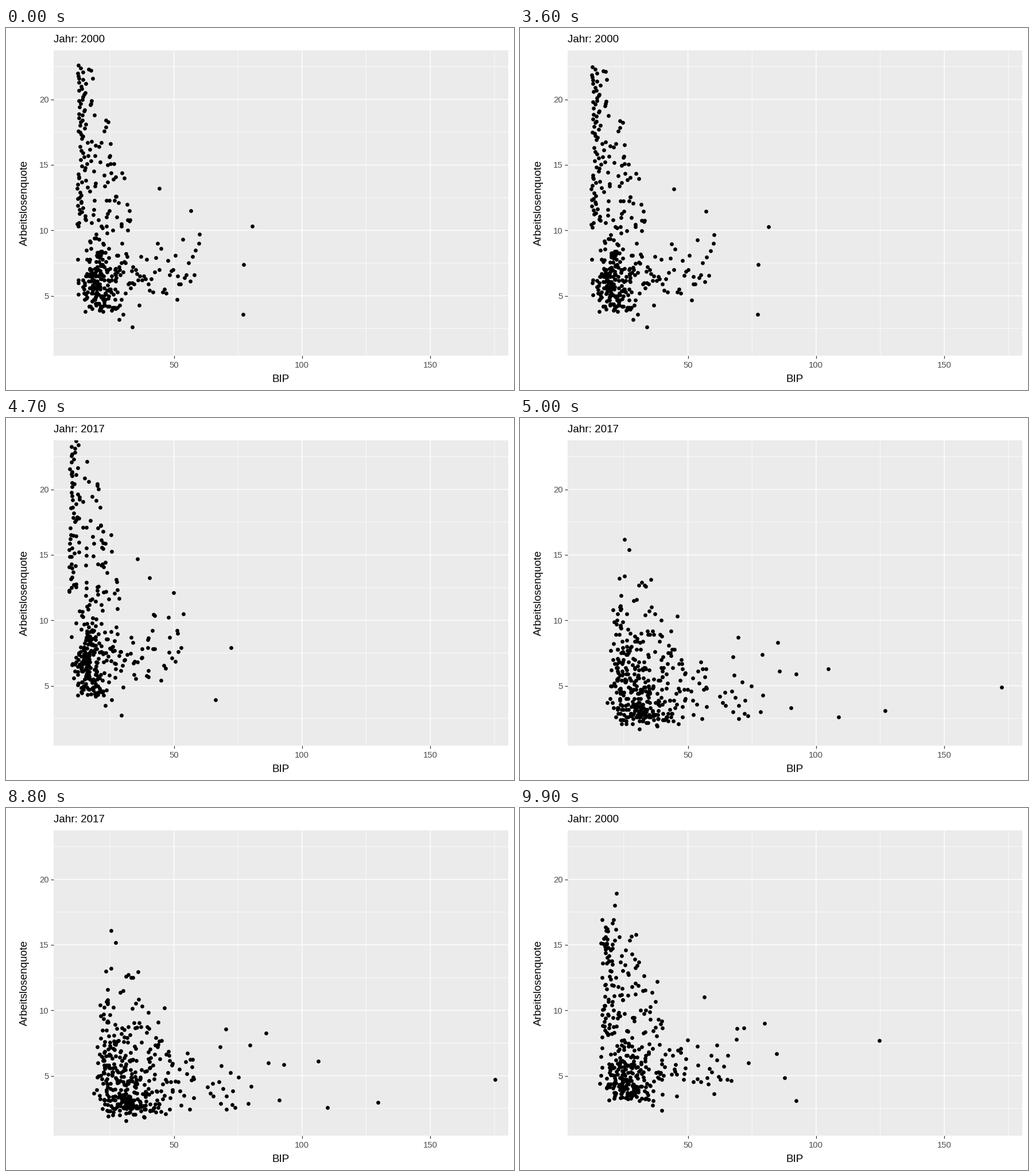
Recreate the animation shown at these times as a matplotlib script. Size 885 px wide and 632 px high, loop 10 s.

```python
import math

import matplotlib.pyplot as plt
import numpy as np
from matplotlib.animation import FuncAnimation

W, H, DPI = 885, 632, 100
FRAMES, INTERVAL, PHASE = 100, 100, 25
LEFT, RIGHT, TOP, BOTTOM = 83, 875, 39, 571.5

plt.rcParams["font.family"] = "Liberation Sans"

# The most isolated districts: GDP and unemployment in 2000, then in 2017
KEY = [
    (80.6, 10.3, 172.3, 4.9), (76.9, 3.6, 108.8, 2.6), (77.3, 7.4, 92.3, 5.9),
    (51.5, 6.5, 127, 3.1), (56.7, 11.5, 104.8, 6.3), (58.5, 8.5, 90.1, 3.3),
    (59.7, 9, 85, 8.3), (60, 9.7, 79, 7.4), (44.3, 13.2, 69.5, 8.7),
    (33.8, 2.6, 46.3, 2.1),
]


def px(n):
    """Pixels to points."""
    return n * 72 / DPI


def group(rng, x, y, growth, ratio, spread):
    """Pair starting values with later ones scaled by noisy factors."""
    x2 = x * rng.normal(growth, spread, x.size)
    y2 = y * rng.normal(ratio, spread, y.size)
    x2 = np.maximum(x2, rng.uniform(17, 22, x.size))
    y2 = np.maximum(y2, rng.uniform(1.6, 2.9, x.size))
    return np.column_stack([x, y, x2, y2])


def districts():
    rng = np.random.default_rng(8)

    # poorer districts with high unemployment
    n = 78
    x = 12 + rng.gamma(2.5, 0.95, n)
    y = np.linspace(10.3, 22.6, n)
    east = group(rng, x, y, 1.72, 0.46, 0.07)

    # cities with a ceiling that falls with wealth
    n = 56
    x = 17.5 + 16.5 * rng.random(n) ** 1.3
    y = 10 + (12.6 - 0.62 * (x - 17.5)) * np.linspace(0, 1, n) ** 1.25
    cities = group(rng, x, y, 1.44, 0.67, 0.08)

    # dense crowd
    n = 197
    x = 20.7 * np.exp(rng.normal(0, 0.18, n))
    y = 3.7 + np.abs(rng.normal(2.5, 1.75, n)) - 0.07 * np.maximum(x - 22, 0)
    west = group(rng, x, y, 1.54, 0.6, 0.13)

    # wealthier districts, thinning out to the right
    n = 60
    x = 27 + 31 * np.linspace(0, 1, n) ** 1.5
    y = rng.triangular(4.2, 7, 9.9, n)
    rich = group(rng, x, y, 1.38, 0.68, 0.12)

    crowd = np.vstack([east, cities, west, rich])
    crowd[:, 1::2] = crowd[:, 1::2].round(1)
    return np.vstack([KEY, crowd])


def elastic_in(t):
    return math.sin(6.5 * math.pi * t) * 2 ** (10 * (t - 1))


def blend(k):
    """Share of the 2017 state in frame k."""
    phase, step = divmod(k, PHASE)
    e = elastic_in(step / PHASE)
    return (0, e, 1, 1 - e)[phase]


def label(x, y, text, **kw):
    return fig.text(x / W, 1 - y / H, text, fontsize=px(18.8), color="black", **kw)


fig = plt.figure(figsize=(W / DPI, H / DPI), dpi=DPI, facecolor="white")
ax = fig.add_axes([LEFT / W, 1 - BOTTOM / H, (RIGHT - LEFT) / W, (BOTTOM - TOP) / H],
                  facecolor="#EBEBEB")
ax.set(xlim=(3.1, 180.4), ylim=(0.45, 23.75),
       xticks=range(50, 151, 50), yticks=range(5, 21, 5))
ax.spines[:].set_visible(False)
ax.set_axisbelow(True)
ax.grid(color="white", linewidth=px(1.4), snap=False)
minor = dict(color="white", linewidth=px(0.75), snap=False, zorder=0.4)
for v in range(25, 180, 50):
    ax.axvline(v, **minor)
for v in np.arange(2.5, 23, 5):
    ax.axhline(v, **minor)
ax.tick_params(length=px(4.6), width=px(1.2), color="#333333",
               labelcolor="#4D4D4D", labelsize=px(14.9))
ax.tick_params(axis="x", pad=px(5.5))
ax.tick_params(axis="y", pad=px(4))

title = label(LEFT, 25, "Jahr: 2000")
label((LEFT + RIGHT) / 2, 617.5, "BIP", ha="center")
label(36.5, 305, "Arbeitslosenquote", ha="center", rotation=90,
      rotation_mode="anchor")

data = districts()
start, end = data[:, :2], data[:, 2:]
dots = ax.scatter(*start.T, s=px(6.8) ** 2, color="black", linewidths=0, zorder=3)


def draw(k):
    dots.set_offsets(start + (end - start) * blend(k))
    title.set_text("Jahr: 2017" if 39 <= k <= 88 else "Jahr: 2000")
    return dots, title


anim = FuncAnimation(fig, draw, frames=FRAMES, interval=INTERVAL,
                     repeat=True, repeat_delay=0, init_func=lambda: draw(0))
plt.show()
```
